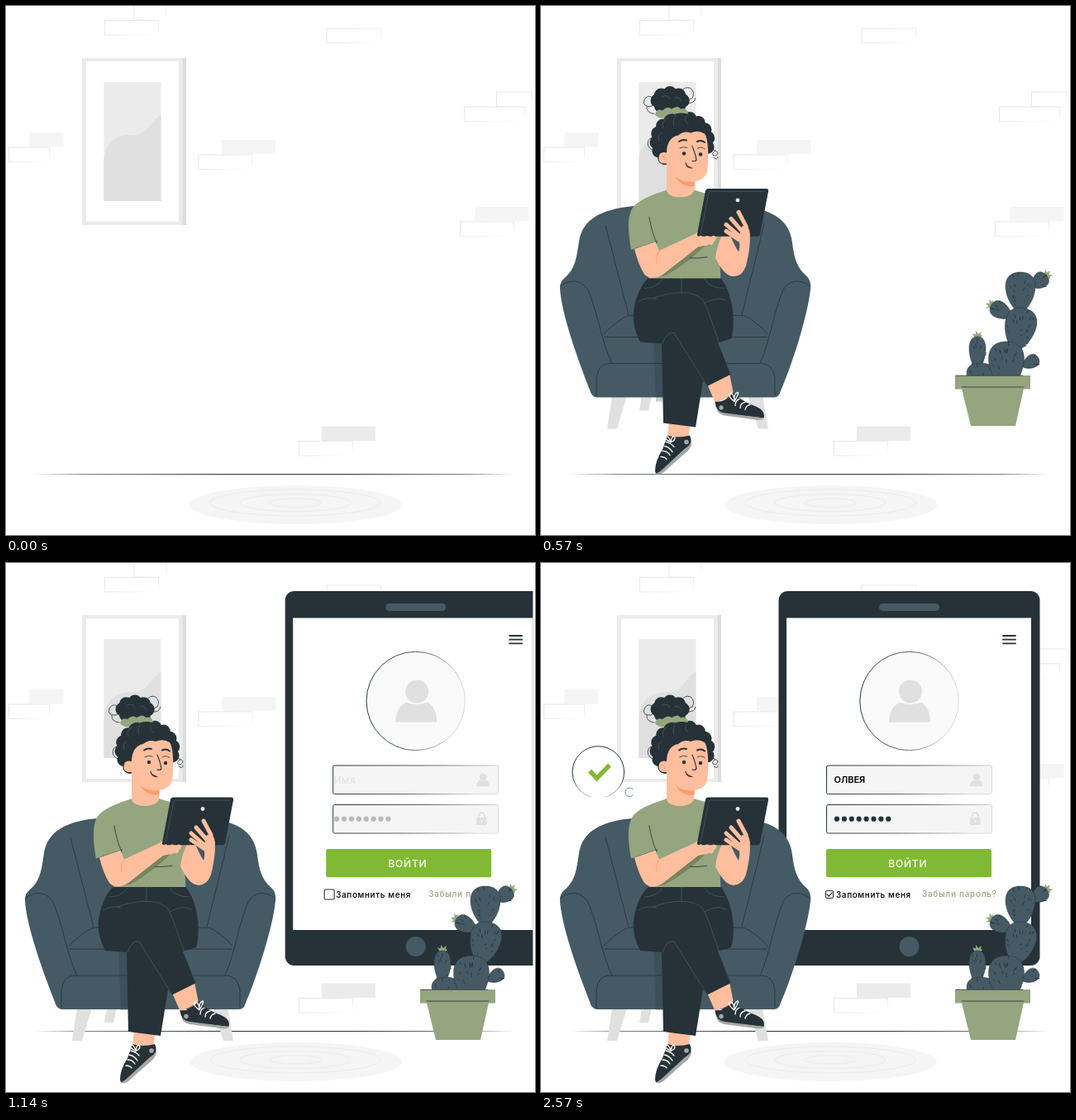
An HTML page that plays this animation: 640 px wide and 640 px high, repeating every 3570 ms.

```html
<!DOCTYPE html>
<html lang="ru">
<head>
<meta charset="utf-8">
<title>Вход</title>
<style>
html, body { margin: 0; width: 100%; height: 100%; overflow: hidden; background: #fff; }
svg { display: block; width: 100%; height: 100%; }
text { font-family: Inter, "Open Sans", sans-serif; }
.dark { fill: #263238; } .slate { fill: #455a64; } .green { fill: #94a57f; }
.skin { fill: #ffbe9d; } .grey { fill: #e0e0e0; } .sole { fill: #a6a6a6; }
.line { fill: none; stroke: #263238; stroke-width: .8; stroke-linecap: round; stroke-linejoin: round; }
.seam { fill: none; stroke: #455a64; stroke-width: .8; stroke-linecap: round; }
.lace { fill: none; stroke: #fff; stroke-width: 1.3; stroke-linecap: round; }
.fold { fill: none; stroke: #ff9b6d; stroke-width: .9; stroke-linecap: round; }
.finger { fill: none; stroke: #ffbe9d; stroke-width: 5; stroke-linecap: round; stroke-linejoin: round; }
</style>
</head>
<body>
<svg viewBox="0 0 640 640" xmlns="http://www.w3.org/2000/svg">
<defs>
  <linearGradient id="brickEdge" x2="1" y2="1"><stop offset="0" stop-color="#e4e4e4"/><stop offset=".6" stop-color="#ececec"/><stop offset="1" stop-color="#fff"/></linearGradient>
  <linearGradient id="edge" x2="1" y2=".15"><stop offset="0" stop-color="#263238"/><stop offset=".55" stop-color="#59646a"/><stop offset="1" stop-color="#d8dada"/></linearGradient>
  <linearGradient id="fadeDown" x2="0" y2="1"><stop offset=".6" stop-color="#263238"/><stop offset="1" stop-color="#c8cccd"/></linearGradient>
  <linearGradient id="floor" gradientUnits="userSpaceOnUse" x1="34" x2="616"><stop offset="0" stop-color="#263238" stop-opacity="0"/><stop offset=".1" stop-color="#263238" stop-opacity=".6"/><stop offset=".4" stop-color="#263238"/><stop offset=".65" stop-color="#263238"/><stop offset=".9" stop-color="#263238" stop-opacity=".6"/><stop offset="1" stop-color="#263238" stop-opacity="0"/></linearGradient>
  <clipPath id="stage"><rect width="637.5" height="640"/></clipPath>
  <clipPath id="soil"><rect x="490" y="380" width="140" height="137"/></clipPath>
  <clipPath id="bubbleClip"><rect x="30" y="215" width="90" height="68"/></clipPath>
  <g id="person"><circle cy="-12" r="14"/><path d="M-26 25Q-26 8 -13 1Q0 6 13 1Q24 8 24 25Z"/></g>
</defs>

<g id="bricks"></g>
<g id="picture">
  <path fill="#ebebeb" d="M92 63H218V265H92Z"/>
  <path fill="#dcdcdc" d="M214 63H218V265H214Z"/>
  <path fill="#fff" d="M97 67H209V261H97Z"/>
  <path fill="#ebebeb" d="M118.5 92H187.5V236H118.5Z"/>
  <path class="grey" d="M118.5 183C122 165 135 156 149 156C173 158 172 140 187.5 132V236H118.5Z"/>
</g>
<path stroke="url(#floor)" d="M34 566.5H616"/>
<g id="rug" fill="none" stroke="#ebebeb">
  <ellipse cx="350.5" cy="603.5" rx="128.5" ry="23.5" fill="#f5f5f5" stroke="none"/>
</g>

<g clip-path="url(#stage)">
  <g id="device">
    <rect class="dark" x="287.5" y="34" width="316" height="453" rx="11"/>
    <path fill="#fff" d="M297 66.5H593V444H297Z"/>
    <rect class="slate" x="409" y="49" width="73" height="9" rx="4.5"/>
    <circle class="slate" cx="445.5" cy="464" r="12"/>
    <path class="line" style="stroke-width:1.8" d="M559 88H574M559 92.7H574M559 97.4H574"/>
    <circle cx="445.5" cy="167" r="59.7" fill="#fafafa" stroke="url(#edge)"/>
    <use href="#person" class="grey" x="447" y="167.5"/>
    <g fill="#f5f5f5" stroke="url(#edge)">
      <rect x="345.5" y="245" width="200" height="34.5" rx="2"/>
      <rect x="345.5" y="292.5" width="200" height="34.5" rx="2"/>
    </g>
    <use href="#person" class="grey" transform="translate(527 262.5) scale(.31)"/>
    <rect class="grey" x="519" y="308" width="12.5" height="9" rx="1"/>
    <path fill="none" stroke="#e0e0e0" stroke-width="1.8" d="M521.5 309V306A3.7 3.7 0 0 1 529 306V309"/>
    <path stroke="#f5f5f5" stroke-width="1.5" d="M525.3 311V314"/>
    <text x="461" y="404.3" font-size="10" font-weight="500" letter-spacing=".7" class="green">Забыли пароль?</text>
  </g>
  <g id="controls">
    <text id="hint" x="354.5" y="266.5" font-size="11.5" letter-spacing="1" class="grey">Имя</text>
    <text id="name" x="354.5" y="266.3" font-size="11" font-weight="600"></text>
    <g id="dots"></g>
    <g id="button">
      <rect x="345" y="346" width="200" height="34.3" rx="2" fill="#80ba34"/>
      <text x="443.8" y="367.7" font-size="12" font-weight="500" letter-spacing=".8" fill="#fff" text-anchor="middle">ВОЙТИ</text>
    </g>
    <rect id="box" class="line" style="stroke-width:1.1" rx="1.5"/>
    <path id="tick" class="line" style="stroke-width:1.3" d="M346.3 401L348.4 403.2L352 398.8"/>
    <text x="357" y="404.5" font-size="10" font-weight="500" letter-spacing=".6">Запомнить меня</text>
  </g>
</g>

<g id="chair">
  <path class="grey" d="M86 538H104L92 578H80ZM250 538H268L275 578H263ZM122 538H134L130 556H119ZM222 538H234L240 556H229Z"/>
  <path class="slate" d="M67 540Q61 539 59 531C45 495 25 440 23 409Q22 401 29 395C42 384 43 370 46 351C50 326 70 315 100 310C140 304.5 210 304.5 250 310C282 314 301 327 304 353C306 371 310 383 320 392Q327.500 398 326 409C323 440 304 500 290 532Q288 540 282 540Z"/>
  <path class="line" d="M24 405C38 395 53 399 59 415C70 444 74 475 86 499M325 405C311 395 296 399 291 415C280 444 276 475 265 499M67 538V517Q69 500 82 499H267Q281 500 283 517V538M76 463Q95 445 106 441H245Q258 446 274 463M77 467H273M78 332L106 440M270 330L243 440"/>
</g>

<g id="woman">
  <path class="dark" opacity=".25" d="M136 466L147 470V541H139Z"/>
  <path class="skin" d="M155 564L181 568L178 586H153ZM201 520L228 507L233 532L211 543Z"/>
  <path class="dark" d="M153 582Q165 586 180 582Q184 590 178 600L146 627Q139 632 138 625Q138 613 147 599Z"/>
  <path class="sole" d="M182 588Q183 596 177 601L148 627Q141 631 139 628Q143 627 148 622L174 598Q181 594 182 588Z"/>
  <circle class="sole" cx="176" cy="590" r="2.8"/>
  <path class="lace" d="M147 601Q153 601 156 606M149 595Q155 596 159 602M151 590Q157 591 161 596M157 590Q148 586 150 583Q154 581 157 590Q159 580 162 585Q162 589 157 590M145 608Q150 608 152 611"/>
  <path class="dark" d="M210.5 541Q222 543 233 530Q241 540 260 547Q272 552 269.5 561L222 556Q211 553 210.5 541Z"/>
  <path class="sole" d="M212 549Q215 554 223 555L269.5 561Q268 564 261 563.3L222 558Q213 556 212 549Z"/>
  <circle class="sole" cx="218" cy="548.5" r="2.7"/>
  <path class="lace" d="M235 546Q235 540 240 538M241 549Q241 543 247 542M247 551Q248 546 253 545M234 541Q225 534 229 531Q234 532 234 541Q240 530 238 530Q233 531 234 541"/>
  <path class="dark" d="M130 391.5H217.5Q230 408 232.5 435Q233.5 455 230 465L214 470L230 508L201 522.5L196 516L187 572L148 567L146 471L120 469Q110 450 112 432Q116 405 130 391.5Z"/>
  <path class="seam" d="M170 392V411M125 404Q140 404 147 393M198 393Q204 404 222 404M118 420Q126 414 140 417M135 416Q176 402 195 417Q200 425 205 440L229 508M147 471Q152 456 161 458L201 522M198 422Q213 413 224 419"/>

  <path class="green" d="M152 285Q168 298 185 285L205 291L219 345L216 368L217.5 392H130L141 346L109 357.5C104 330 105 312 113 304C122 295 138 290 152 285Z"/>
  <path fill="#75865f" d="M138 391L190 352L203 348Q178 374 150 389Z"/>
  <path class="line" d="M131 318Q134 336 139 347M180 367.5Q190 368 201 366.3"/>
  <path class="skin" d="M113 356.5L138.5 347.5L143 358.5L186 338.5Q193 332 206 336L213 341L211 346L204 351L190 354L148 387Q134 396 125 387Q118 376 113 356.5Z"/>
  <path class="fold" d="M143 359Q138 365 140 374M193 349L202 345"/>
  <path class="skin" d="M219 340H229Q234 352 239 360Q242 350 238 344L252 334Q255 348 248 377Q243 391 231 389.5Q221 388 211 367Q213 352 219 340Z"/>
  <path class="dark" d="M202 283.5H273Q275.5 283.5 275 287L265 339Q264 341.3 262 341.3H191Q188.500 341.3 189 338.5L199 286Q199.5 283.5 202 283.5Z"/>
  <path class="seam" d="M193 338L203 288.5Q204 287 206 287H270"/>
  <circle cx="238" cy="297.5" r="2.4" fill="#e8e8e8"/>
  <path class="finger" d="M239 312L248 329L250 339M230 320L244 336M224 327L241 342M224 335L239 345"/>
  <path class="skin" d="M243 329Q253 328 253 340L248 352L238 347Z"/>
  <path class="finger" d="M193 343L196 348M201 343L199 350M209 343L206 349"/>

  <g id="hair" class="dark"></g>
  <path class="green" d="M138 194Q140 186 147 189Q153 183 158 187Q166 182 169 187Q177 185 178 193Q169 191 163 193Q153 192 149 198Q142 199 138 194Z"/>
  <path class="skin" d="M152 240C152 229 157 220 166 219Q173 213 181 216Q190 212 198 217C203 224 203 248 201 263Q198 273 185.5 275L185 287Q180 294 168 294Q156 294 152 287L152 253Q142 254 142.5 246Q143 238 152 240Z"/>
  <path fill="#ff9b6d" d="M163 269Q172 277 185.5 275V281Q168 281 163 269Z"/>
  <path class="fold" d="M146 244Q150 244 150 249"/>
  <path class="line" style="stroke-width:2" d="M167 226.5Q171 223.5 176 225M189 226.5Q194 224 198 227.5"/>
  <path class="line" d="M168 234.5Q172 232 177 234M189 235Q193 232 198 235.5"/>
  <circle class="dark" cx="173" cy="241" r="2.2"/><circle class="dark" cx="193" cy="242" r="2.2"/>
  <path class="line" style="stroke-width:1.1" d="M183 232Q187 242 188 249Q186 251 183 250M175 252Q176 259 183 258.5"/>
  <path fill="#6b2f35" d="M176 254Q178 257 182 257.5Q178 260 176 254Z"/>
  <path class="line" d="M133 184Q122 185 125 176Q130 168 136 175Q139 181 133 184M170 167Q173 159 181 162Q187 167 183 174Q177 178 172 173M176 180Q186 181 187 174M137 193Q127 192 128 184M135 237Q127 233 130 225Q133 220 138 224M204 236Q211 236 214 240Q213 245 208 243Q206 240 211 238M209 246Q214 250 214 245"/>
  <path class="seam" d="M153 198Q145 202 148 210M163 195Q158 202 161 208M176 196Q172 200 178 205M146 216Q140 219 143 226M147 172Q153 169 156 175M162 174Q167 171 170 178"/>
</g>

<g id="cactus">
  <g id="pads" clip-path="url(#soil)"></g>
  <path class="green" d="M509 532H584L574 577H520ZM501 516H592V532.5H501Z"/>
  <path class="line" d="M502 516.2H583M509 530H584"/>
</g>

<g id="bubble" clip-path="url(#bubbleClip)">
  <circle cx="69.3" cy="253" r="31.3" fill="#fff" stroke="url(#fadeDown)"/>
  <path fill="none" stroke="#80ba34" stroke-width="5.5" d="M59 251.5L67.5 260.5L83 244.5"/>
  <path class="line" style="stroke:#59646a" d="M111 273.5A5.3 5.3 0 1 0 111 281"/>
</g>
</svg>

<script>
const $ = id => document.getElementById(id);
function add(parent, tag, attrs) {
  const el = document.createElementNS("http://www.w3.org/2000/svg", tag);
  for (const key in attrs) el.setAttribute(key, attrs[key]);
  return parent.appendChild(el);
}

// A brick, with a second one resting on it to the right
const brick = (x, y, width, fill) =>
  add($("bricks"), "rect", { x, y, width, height: 17.5, fill: fill || "#fff", stroke: fill ? "none" : "url(#brickEdge)" });
function bricks(x, y, width, shift, topWidth, fill) {
  brick(x + shift, y - 18, topWidth, fill);
  brick(x, y, width);
}
brick(388, 27, 65.5);
bricks(119.5, 17.5, 65, 35.5, 39);
bricks(554.5, 122, 73, 39, 43);
bricks(3.5, 171, 49, 25, 41, "#f5f5f5");
bricks(233, 180, 65, 28, 65, "#f5f5f5");
bricks(549.5, 261, 65, 18, 65, "#f5f5f5");
bricks(354.5, 526.5, 65, 27.5, 65, "#ebebeb");

for (let i = 1; i <= 3; i++) add($("rug"), "ellipse", { cx: 350, cy: 601, rx: 36 * i - 5, ry: 5.3 * i });

// Curls along an arc, angles in turns
function curls(cx, cy, rx, ry, count, from, to) {
  add($("hair"), "ellipse", { cx, cy, rx, ry });
  for (let i = 0; i < count; i++) {
    const a = 2 * Math.PI * (from + (to - from) * i / (count - 1));
    add($("hair"), "circle", { cx: cx + rx * Math.cos(a), cy: cy + ry * Math.sin(a), r: 8.5 });
  }
}
curls(156, 177, 15, 9, 9, 0, 1);
curls(171, 226, 31, 28, 12, .37, 1.04);

// Egg-shaped cactus pads with scattered spines, some in flower
let seed = 7;
const rand = () => (seed = seed * 16807 % 2147483647) / 2147483647;
function pad(cx, cy, w, h, turn, flower) {
  const g = add($("pads"), "g", { transform: `translate(${cx} ${cy}) rotate(${turn})` });
  if (flower) add(g, "path", { class: "green", d: "M-3 1L-6 -5L-2.5 -3.5L-1.5 -8L1 -4L5 -7L4 -3L6 -2L3 1Z", transform: `translate(0 ${1 - h})` });
  add(g, "path", { class: "slate", stroke: "#263238", "stroke-width": .5,
    d: `M0 ${h}C${-w * .9} ${h * .7} ${-w * 1.7} ${-h} 0 ${-h}S${w * .9} ${h * .7} 0 ${h}Z` });
  let d = "";
  for (let i = 0; i < w * h / 26; i++) {
    const a = rand() * 2 * Math.PI, r = Math.sqrt(rand()) * .9;
    d += `M${w * r * Math.cos(a)} ${h * r * Math.sin(a)}l${2 * Math.cos(a)} ${2 * Math.sin(a) - 2}`;
  }
  add(g, "path", { d, class: "line" });
}
pad(603, 402, 9.5, 11, 50, true);
pad(557, 438, 10, 14, -60, true);
pad(592, 500, 8, 11, 60);
pad(580, 416, 18, 25, 0);
pad(579, 461, 19, 27, 12);
pad(528, 490, 10, 21, 0, true);
pad(532, 518, 17, 17, 0);
pad(563, 505, 21.5, 30, 0);

const dots = Array.from({ length: 8 }, (_, i) => add($("dots"), "circle", { cx: 358 + i * 8.9, cy: 309.7, r: 3.1 }));

const STEP = 500 / 7, LOOP = 3570, NAME = "ОЛВЕЯ";
const clamp = (v, lo = 0, hi = 1) => Math.min(hi, Math.max(lo, v));
const smooth = v => v * v * (3 - 2 * v);
const move = (id, x, y) => $(id).setAttribute("transform", `translate(${x} ${y})`);
const show = (id, on) => $(id).style.display = on ? "" : "none";

// Sine easing down to rest
const drop = (height, k) => -height * (1 - Math.cos(.16 * Math.max(0, 11.35 - k)));

// Eases in from the right, overshoots, settles
function slideIn(k) {
  const left = clamp((24 - k) / 11.56), back = 1.28;
  return 352 * left * left * ((back + 1) * left - back);
}

// The picture changes on a 10 ms grid, about 14 times a second
function stepAt(ms) {
  const k = Math.floor((ms + 5) / STEP);
  return Math.round(k * STEP / 10) * 10 > ms ? k - 1 : k;
}

function draw(k) {
  const chairY = drop(474.6, k);
  const lag = -86 + 90 * smooth(clamp((k - 6) / 2));
  move("chair", 0, chairY);
  move("woman", 0, Math.min(0, chairY + lag));
  move("cactus", 0, drop(492, k));

  const slide = slideIn(k);
  move("device", slide, 0);
  move("controls", slide * .84, 0);

  const typed = Math.max(0, k - 19);
  show("hint", !typed);
  $("name").textContent = NAME.slice(0, typed);
  dots.forEach((dot, i) => dot.setAttribute("fill", i < typed * 2 ? "#263238" : "#bababa"));

  const size = 12 - 1.5 * clamp(k - 24, 0, 2);
  const box = { x: 349 - size / 2, y: 401 - size / 2, width: size, height: size };
  for (const key in box) $("box").setAttribute(key, box[key]);
  show("tick", k >= 26);

  const zoom = k === 29 || k === 30 ? 1.07 : 1;
  $("button").setAttribute("transform", `translate(445 363) scale(${zoom}) translate(-445 -363)`);
  $("bubble").setAttribute("opacity", clamp((k - 32) / 4));
}

const begin = performance.now();
function tick() {
  draw(stepAt((performance.now() - begin) % LOOP));
  requestAnimationFrame(tick);
}
tick();
</script>
</body>
</html>
```
